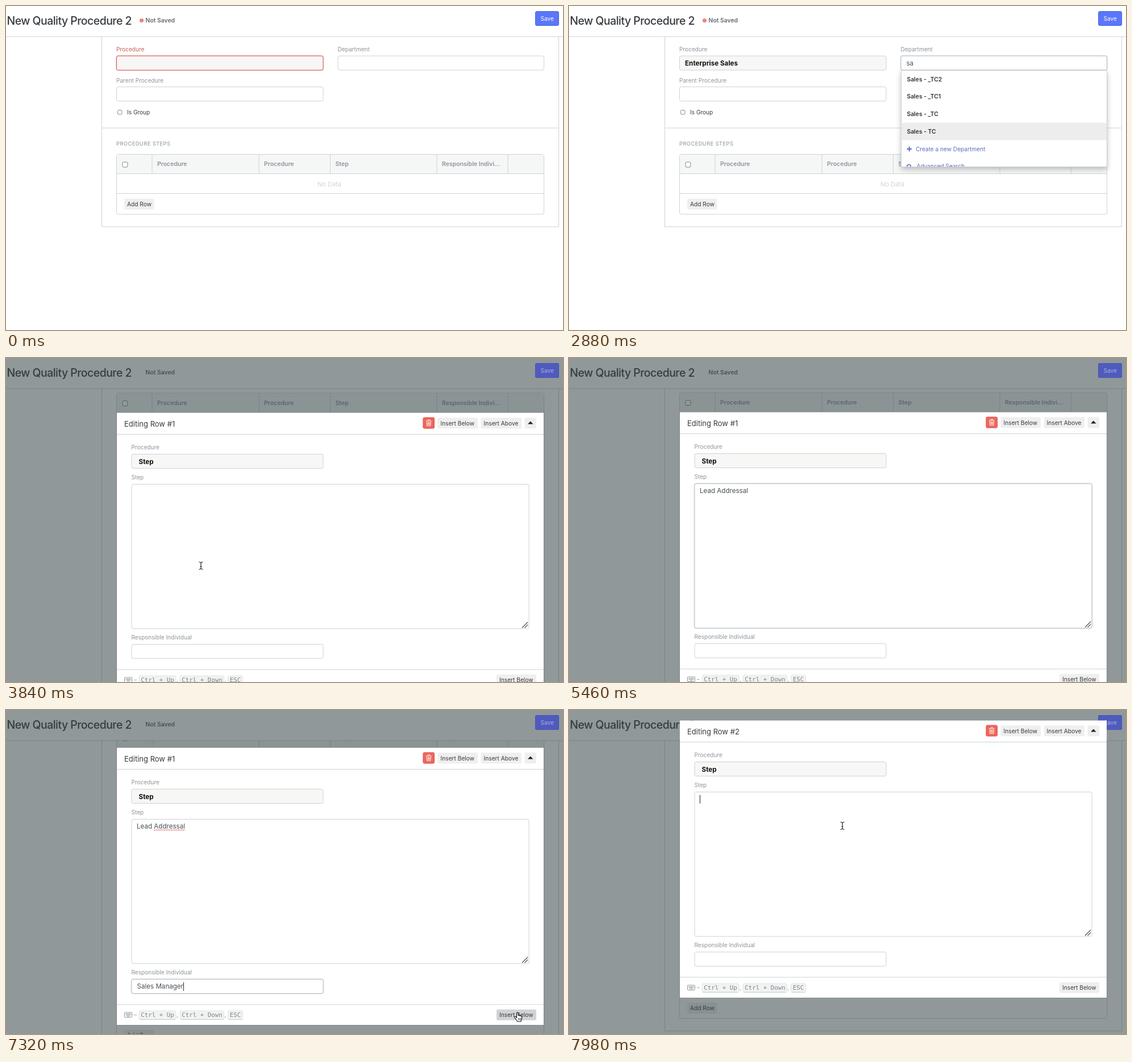
An HTML page that plays this animation: 980x571 px, repeating every 8 s.

```html
<!DOCTYPE html>
<html lang="en">
<head>
<meta charset="utf-8">
<title>New Quality Procedure</title>
<style>
html, body { margin: 0; width: 100%; height: 100%; overflow: hidden; background: #fff; }
svg { display: block; }
#stage { width: 100vw; height: 100vh; }
text { font-family: Inter, Roboto, sans-serif; white-space: pre; }
.mono { font-family: "DejaVu Sans Mono", "Liberation Mono", monospace; }
.drop { filter: drop-shadow(0 4px 5px rgba(0, 0, 0, .24)); }
</style>
</head>
<body>
<svg id="stage" viewBox="0 0 980 571"></svg>
<script>
const LOOP = 8000;
const LINE = '#cdd2d5', GREY = '#8d959b', DARK = '#363b40', BLUE = '#5b6cc0';
const COLUMNS = [257, 445, 570.5, 758, 883];
const stage = document.getElementById('stage');
const pen = document.createElement('canvas').getContext('2d');

const clamp = v => Math.max(0, Math.min(1, v));
const ramp = (t, a, b) => { const p = clamp((t - a) / (b - a)); return p * p * (3 - 2 * p); };
const typed = (str, t, start, step = 60) => str.slice(0, Math.max(0, Math.floor((t - start) / step) + 1));

// Text is placed by its left edge and the middle of its capitals.
function text(x, y, str, size = 10.1, fill = DARK, weight = 400, extra = '') {
  return `<text x="${x}" y="${y + size * .36}" font-size="${size}" fill="${fill}" font-weight="${weight}" ${extra}>${str}</text>`;
}
function rect(x, y, w, h, fill, stroke = 'none', r = 0, extra = '') {
  return `<rect x="${x}" y="${y}" width="${w}" height="${h}" rx="${r}" fill="${fill}" stroke="${stroke}" ${extra}/>`;
}
const path = (d, stroke, width = 1, fill = 'none') =>
  `<path d="${d}" stroke="${stroke}" stroke-width="${width}" fill="${fill}"/>`;
const hline = (x1, x2, y) => path(`M${x1} ${y}H${x2}`, LINE);
const button = (x, y, w, label, hover) =>
  rect(x, y, w, 19, hover ? '#d0d4d6' : '#efefef', 'none', 2) + text(x + 5, y + 9.8, label, 10.2);
const checkbox = (x, y, s) => rect(x, y, s, s, '#fff', '#82878a', 2);

function textWidth(str, size, weight) {
  pen.font = `${weight} ${size}px Inter, Roboto, sans-serif`;
  return pen.measureText(str).width;
}

function input(x, y, w, h, o = {}) {
  const weight = o.bold ? 700 : 400, size = o.bold ? 11.7 : 11.6;
  const left = x + (o.pad || 9.5), mid = y + 12.8, value = o.value || '';
  let s = '';
  if (o.focus) s += rect(x, y, w, h, 'none', o.border || '#9aa4ab', 3.5, 'stroke-width="4" opacity=".16"');
  s += rect(x, y, w, h, o.bold ? '#f7f7f5' : '#fff', o.border || (o.focus ? '#b4bbc0' : LINE), 3);
  s += text(left, mid, value, size, o.bold ? '#111' : '#4a5055', weight);
  if (o.caret) {
    const cx = left + textWidth(value, size, weight) + .5;
    s += path(`M${cx} ${mid - 7.5}v15`, '#222');
  }
  return s;
}

function dropdown(x, y, w, items, active) {
  const rowH = 30.75;
  const rows = items.map((item, i) => {
    const top = i * rowH, mid = top + 15.5;
    const back = i === active ? rect(0, top, w, rowH, '#ededed') : '';
    if (item.icon === 'plus')
      return back + path(`M10 ${mid}h8.5M14.2 ${mid - 4.2}v8.5`, BLUE, 2) + text(25.5, mid, item.label, 10.1, BLUE);
    if (item.icon === 'find')
      return back + `<circle cx="13.5" cy="${mid}" r="3.2" fill="none" stroke="${BLUE}" stroke-width="1.6"/>` +
        path(`M16 ${mid + 2.5}l2.5 2.5`, BLUE, 1.8) + text(27, mid, item.label, 10.1, BLUE);
    return back + text(10, mid, item, 10.3, '#2e3338', 600);
  }).join('');
  return `<g class="drop">${rect(x, y, w, 170, '#fff', '#c9cdd0', 2)}</g>` +
    `<svg x="${x}" y="${y}" width="${w}" height="169.5">${rows}</svg>`;
}

const linkItems = (names, kind) => [...names,
  { icon: 'plus', label: 'Create a new ' + kind }, { icon: 'find', label: 'Advanced Search' }];

function scrollAt(t) {
  if (t >= 7380) return 146 + 165.5 * ramp(t, 7540, 7860);
  return 199.5 * ramp(t, 3440, 3760) + ramp(t, 3900, 4000) + 29 * ramp(t, 5520, 5760);
}

function header(t, editing) {
  let s = rect(0, 0, 980, 54, '#fff') + hline(0, 980, 54);
  s += text(1.5, 26, 'New Quality Procedure 2', 19.5, DARK, 500, 'letter-spacing="-.55"');
  if (!editing) s += '<circle cx="238.5" cy="25.5" r="3.6" fill="#ee8381"/>';
  s += text(245.5, 25.5, 'Not Saved', 10.4, '#62696f', 600);
  return s + rect(931.5, 9.5, 41, 25, '#5b76f7', '#4b66e4', 2.5) + text(940.5, 22.5, 'Save', 10.1, '#fff');
}

function form(t, S, blink, editing, rows, editEnd) {
  const end = editing ? editEnd : 330.5 - S;
  const Y = y => y - S;
  const inProc = t < 1200, inDept = t >= 1200 && t < 3000;
  const dept = t >= 2940 ? 'Sales - TC' : typed('sa', t, 2040, 120);
  let s = rect(168.5, Y(-40), 804, end + 58.5 - Y(-40), '#fff', LINE);

  s += text(194, Y(76.5), 'Procedure', 10.1, inProc ? '#c4605a' : GREY);
  s += input(194.5, Y(88), 363.5, 25, { bold: true, value: typed('Enterprise Sales', t, 60),
    focus: inProc, border: inProc ? '#d9534f' : '', caret: inProc && blink });
  s += text(583.5, Y(76.5), 'Department', 10.1, GREY);
  s += input(584, Y(88), 362.5, 25, { value: dept, focus: inDept, caret: inDept && blink });
  s += text(194, Y(131), 'Parent Procedure', 10.1, GREY);
  s += input(194.5, Y(142.5), 363.5, 25);
  s += checkbox(196.5, Y(183.5), 7.5) + text(213, Y(187), 'Is Group', 10.1);

  s += hline(168, 973, Y(215));
  s += text(194, Y(243), 'PROCEDURE STEPS', 9.4, GREY, 400, 'letter-spacing=".4"');

  // Steps table
  const top = Y(261.5);
  s += rect(194.5, top, 752, end + 36.5 - top, '#fff', LINE, 3);
  s += rect(195, top + .5, 751, 33.5, '#f5f7f7') + hline(195, 946, top + 34);
  s += path(COLUMNS.map(x => `M${x} ${top}v34`).join(''), LINE);
  s += checkbox(205, top + 13.5, 9);
  ['Procedure', 'Procedure', 'Step', 'Responsible Indivi...'].forEach((label, i) => {
    s += text(COLUMNS[i] + 9, top + 17, label, 10.5, GREY, 600);
  });
  if (rows) {
    const mid = top + 51.5;
    s += path(COLUMNS.map(x => `M${x} ${top + 34}v34`).join(''), LINE);
    s += checkbox(205, mid - 3.5, 9) + text(243, mid, '1', 10.1) + text(266, mid, 'Step', 10.5, DARK, 600);
    s += text(579, mid, 'Lead Addressal') + text(767, mid, 'Sales Manager');
    s += path(`M927 ${mid - 2.5}h10l-5 5z`, 'none', 0, '#b4bbc0');
  }
  if (!editing) s += text(548, Y(314), 'No Data', 11, '#cfd4d8');
  s += hline(195, 946, end);
  return s + button(208, end + 9, 52.5, 'Add Row', t >= 3200 && t < 3440);
}

function footerKeys(y) {
  let s = rect(208.5, y - 4.5, 13, 8.5, '#fff', '#8a9298', 1) +
    path(`M210.5 ${y - 2}h9M210.5 ${y}h9`, '#8a9298', 1.1) + path(`M212.5 ${y + 2.2}h5`, '#8a9298');
  s += text(225, y, '–', 10.1, GREY);
  [['Ctrl + Up', 234, 65], ['Ctrl + Down', 306, 77.5], ['ESC', 390.5, 26]].forEach(([key, x, w], i) => {
    s += rect(x, y - 7.5, w, 15, '#f1f2f2', '#e2e5e6', 2) + path(`M${x + 1} ${y + 8}h${w - 2}`, '#c8cdd0');
    s += text(x + 3.2, y, key, 10.8, '#7f868c', 400, 'class="mono"');
    if (i < 2) s += text(x + w + 1, y, ',', 10.1, GREY);
  });
  return s;
}

function editor(t, T, blink, second) {
  const inStep = second ? t >= 7800 : t >= 4320 && t < 5520;
  const inPerson = !second && t >= 5520;
  const step = second ? '' : typed('Lead Addressal', t, 4560);
  const person = second ? '' : t >= 6720 ? 'Sales Manager' : typed('sale', t, 6060);
  let s = rect(195, T, 751, 488.5, '#fff');
  s += text(208, T + 19.5, 'Editing Row #' + (second ? 2 : 1), 13);

  s += rect(734, T + 8.5, 19.5, 19, '#ee675d', '#dc4d45', 2);
  s += path(`M739 ${T + 14.5}h9.5M742 ${T + 14}v-1.5h3.5v1.5M740 ${T + 15}l.6 8h6.3l.6-8M742.3 ${T + 16.5}v5M743.8 ${T + 16.5}v5M745.3 ${T + 16.5}v5`, '#fff', .9);
  s += button(759.5, T + 8.7, 70.5, 'Insert Below') + button(835.5, T + 8.7, 71.5, 'Insert Above');
  s += rect(912.5, T + 8.7, 20.5, 19, '#efefef', 'none', 2) + path(`M918 ${T + 20}h9.5l-4.75-5z`, 'none', 0, '#222');
  s += hline(195, 946, T + 38);

  s += text(220.5, T + 61, 'Procedure', 10.1, GREY);
  s += input(221, T + 73, 337, 25, { bold: true, value: 'Step', pad: 12.5 });
  s += text(220.5, T + 114, 'Step', 10.1, GREY);
  s += input(221, T + 126, 699, 254.5, { value: step, pad: 9, focus: inStep && !second, caret: inStep && blink });
  s += path(`M908 ${T + 379}l10-10M912.5 ${T + 379}l5.5-5.5`, '#4b4f52', 1.1);
  if (!second && t >= 6060) {
    const x = 230 + textWidth('Lead ', 11.6, 400), end = 230 + textWidth(step, 11.6, 400);
    s += `<path d="M${x} ${T + 145}H${end}" stroke="#d9433c" stroke-width="1.6" stroke-dasharray="1.6 1.4"/>`;
  }
  s += text(220.5, T + 396, 'Responsible Individual', 10.1, GREY);
  s += input(221, T + 408, 337, 25, { value: person, focus: inPerson, caret: inPerson && blink });

  s += hline(195, 946, T + 452.5) + footerKeys(T + 471);
  s += button(863, T + 461.3, 70, 'Insert Below', !second && t >= 7140);
  if (t >= 6420 && t < 6720) {
    const names = ['Sales Manager', 'Sales Master Manager', 'Sales User'];
    s += dropdown(221, T + 433, 337, linkItems(names, 'Role'), 0);
  }
  return s;
}

const SHAPES = {
  arrow: path('M0 0v14l3.3-3 2.2 5 2.4-1-2.2-4.9h4.5z', '#fff', 1, '#111'),
  hand: path('M-2.5-6.5c0-1.8 2.6-1.8 2.6 0v4c.5-1 2.2-.8 2.3.3.6-.8 2.1-.5 2.2.6.7-.6 1.9-.2 1.9.9v3.2c0 3-1.5 3.5-1.5 5.5h-6.5c0-2-3.6-5-4.7-7.3-.6-1.6 1.3-2.3 2.2-1l1.5 1.7z', '#111', 1.1, '#fff') +
    path('M.6 2v3.5M2.6 2v3.5M4.4 2v3.5', '#111', .8),
  beam: path('M-3.5-6.5q3.5 0 3.5 2.5v8q0 2.500-3.500 2.500M3.500-6.500q-3.500 0-3.500 2.500M0 4q0 2.500 3.500 2.500', '#fff', 2.6) +
    path('M-3.5-6.500q3.500 0 3.500 2.500v8q0 2.500-3.500 2.500M3.500-6.500q-3.500 0-3.500 2.500M0 4q0 2.500 3.500 2.500M-1.500 1.500h3', '#222', 1.2)
};

// Each stop: time, x, y and the pointer used from then on.
const STOPS = [
  [2960, 560, 250, 'arrow'], [3180, 240, 349, 'hand'], [3440, 236, 350, 'beam'],
  [3700, 343, 366, 'beam'], [4320, 343, 366, 'beam'], [4560, 343, 366, ''],
  [6760, 343, 366, 'beam'], [6980, 640, 462, 'arrow'], [7140, 901, 541, 'hand'],
  [7380, 901, 541, 'beam'], [7500, 710, 462, 'beam'], [7820, 481, 204, 'beam'], [LOOP, 481, 204, '']
];
function pointer(t) {
  const i = STOPS.findIndex(stop => stop[0] > t);
  if (i < 1 || !STOPS[i - 1][3]) return '';
  const [t0, x0, y0, kind] = STOPS[i - 1], [t1, x1, y1] = STOPS[i];
  const p = (t - t0) / (t1 - t0);
  return `<g transform="translate(${x0 + (x1 - x0) * p} ${y0 + (y1 - y0) * p})">${SHAPES[kind]}</g>`;
}

function scene(t) {
  const S = scrollAt(t), editing = t >= 3400, second = t >= 7380;
  const blink = Math.floor(t / 180) % 2 === 1 || t >= 7200;
  const T = 296 - S + (second ? 34 : 0);
  let s = form(t, S, blink, editing, second, T + 488.5) + header(t, editing);
  if (editing) {
    const dim = ramp(t, 3380, 3500);
    s += rect(0, 0, 980, 571, '#334143', 'none', 0, `opacity="${.54 * dim}"`);
    s += `<g opacity="${dim}">` + rect(931.5, 9.5, 41, 25, '#4f5cbd', '#4854ad', 2.5) +
      text(940.5, 22.5, 'Save', 10.1, '#a9b0dc') + '</g>';
    if (second) s += '<circle cx="238.5" cy="25.5" r="3.6" fill="#cd6a58"/>';
    s += editor(t, T, blink, second);
  } else if (t >= 2220 && t < 2940) {
    const names = ['Sales - _TC2', 'Sales - _TC1', 'Sales - _TC', 'Sales - TC'];
    const active = Math.floor(3 * clamp((t - 2400) / 360));
    s += dropdown(584.5, 113.5, 362, linkItems(names, 'Department'), active);
  }
  return s + pointer(t);
}

let last = '';
function draw() {
  const next = scene(performance.now() % LOOP);
  if (next !== last) stage.innerHTML = last = next;
  requestAnimationFrame(draw);
}
draw();
</script>
</body>
</html>
```
